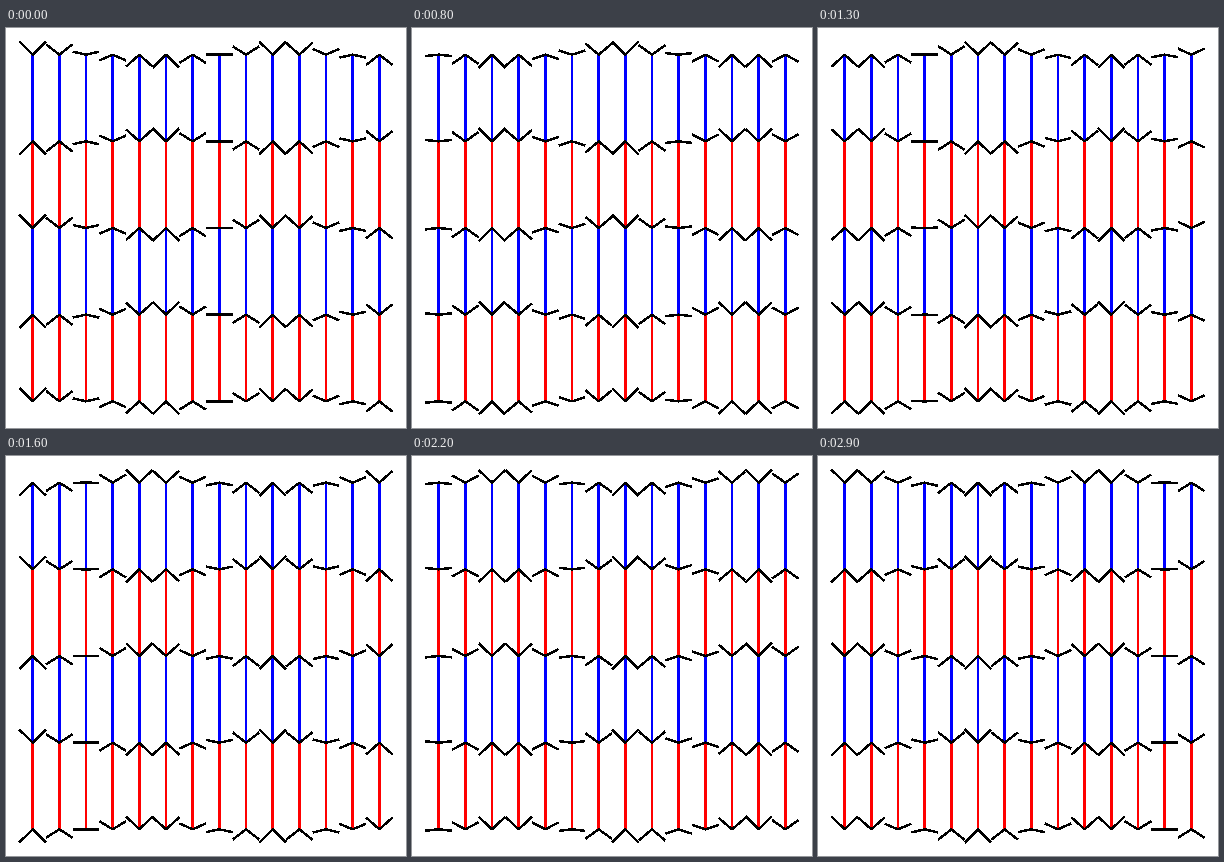
An HTML page for the animation above (3 s loop, 400 by 400 pixels).

```html
<!DOCTYPE html>
<html lang="en">
<head>
<meta charset="utf-8">
<title>Dynamic arrow-fin illusion</title>
<style>
  html, body { margin: 0; width: 100%; height: 100%; overflow: hidden; background: #fff; }
  svg { display: block; width: 400px; height: 400px; }
  path { fill: none; stroke-width: 2.5; stroke-linejoin: bevel; shape-rendering: crispEdges; }
</style>
</head>
<body>
<svg viewBox="0 0 400 400">
  <path id="blue" stroke="#00f"/>
  <path id="red" stroke="#f00"/>
  <path id="fins" stroke="#000"/>
</svg>
<script>
const COLS = 14, ROWS = 5, WAVES = 1.5;
const STEP_MS = 100, STEPS = 30;
const PITCH = 400 / (COLS + 1);
const FIN = PITCH / 2;
const ROW_GAP = (400 - 2 * PITCH) / (ROWS - 1);

const colX = col => PITCH * (col + 1);
const rowY = row => PITCH + ROW_GAP * row;
const setPath = (id, d) => document.getElementById(id).setAttribute("d", d);

function shafts(firstRow) {
  let d = "";
  for (let row = firstRow; row < ROWS - 1; row += 2)
    for (let col = 0; col < COLS; col++)
      d += `M${colX(col)} ${rowY(row)}V${rowY(row + 1)}`;
  return d;
}

function fins(step) {
  let d = "";
  for (let col = 0; col < COLS; col++) {
    const x = colX(col);
    const lift = FIN * Math.cos(2 * Math.PI * (WAVES * col / COLS + step / STEPS));
    for (let row = 0; row < ROWS; row++) {
      const y = rowY(row);
      const tip = y + (row % 2 ? lift : -lift);
      d += `M${x - FIN} ${tip}L${x} ${y}L${x + FIN} ${tip}`;
    }
  }
  return d;
}

setPath("blue", shafts(0));
setPath("red", shafts(1));

let shown = -1;
function tick() {
  const step = Math.floor(performance.now() / STEP_MS) % STEPS;
  if (step !== shown) {
    setPath("fins", fins(step));
    shown = step;
  }
  requestAnimationFrame(tick);
}
tick();
</script>
</body>
</html>
```
